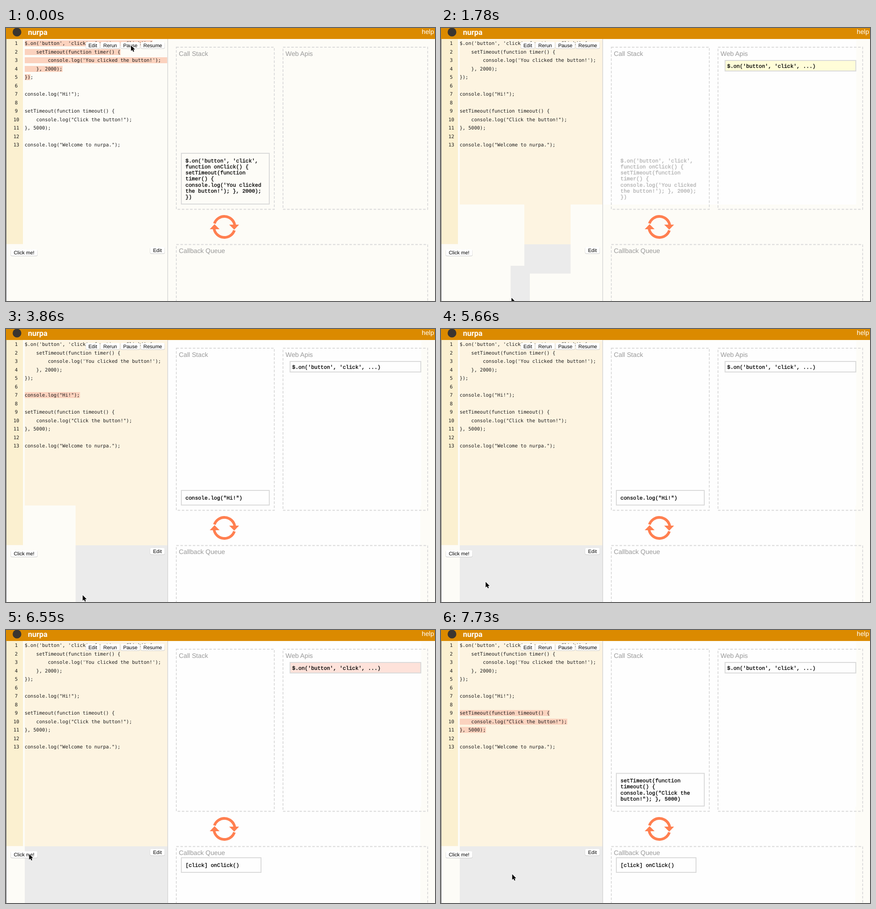
An HTML page that plays this animation: 937 px wide and 597 px high, repeating every 8 s.

```html
<!DOCTYPE html>
<html lang="en">
<head>
<meta charset="utf-8">
<title>Event loop visualiser</title>
<style>
  html, body { margin: 0; width: 100%; height: 100%; overflow: hidden; background: #fdfcf7; }
  svg { display: block; }
  text { white-space: pre; font-family: "Liberation Sans", Arial, sans-serif; text-rendering: geometricPrecision; }
  .code { font: 10.54px "DejaVu Sans Mono", monospace; fill: #1c1c1c; }
  .item { font: 11.5px "Liberation Mono", "Courier New", monospace; stroke-width: 0.35; }
  .label { font-size: 14.2px; fill: #999; }
  .button { font-size: 11px; text-anchor: middle; }
  .logo { font: bold 16.5px Roboto, sans-serif; fill: #fff; }
</style>
</head>
<body>
<svg id="stage" width="937" height="597" viewBox="0 0 937 597"></svg>
<script>
const LOOP = 8000;
const svg = document.getElementById('stage');
const timed = [];

function add(tag, attrs, parent = svg) {
  const el = document.createElementNS('http://www.w3.org/2000/svg', tag);
  for (const key in attrs) el.setAttribute(key, attrs[key]);
  return parent.appendChild(el);
}
const rect = (x, y, right, bottom, fill, more, parent) =>
  add('rect', { x, y, width: right - x, height: bottom - y, fill, ...more }, parent);
function text(str, x, y, cls, more, parent) {
  const el = add('text', { x, y, class: cls, ...more }, parent);
  el.textContent = str;
  return el;
}
// Shows an element only while from <= time < to.
function during(from, to, el = add('g', {})) {
  timed.push({ el, from, to });
  return el;
}

// Backgrounds: pale at first, repainted in stronger tones patch by patch
rect(0, 0, 937, 597, '#fdfcf7');
const clip = add('clipPath', { id: 'repainted' });
[
  [140, 270, 38, 284, 254],
  [290, 182, 236, 283, 537],
  [430, 152, 520, 194, 597],
  [1780, 41, 26, 907, 386],
  [1930, 152, 71, 905, 597],
  [5660, 41, 138, 177, 597]
].forEach(([from, ...box]) => during(from, LOOP, rect(...box, '#000', {}, clip)));
const strong = add('g', { 'clip-path': 'url(#repainted)' });
rect(37, 24, 353, 473, '#fdf4e1', {}, strong);
rect(2, 473, 353, 597, '#ebebeb', {}, strong);
rect(354, 24, 937, 597, '#fefefe', {}, strong);

rect(1, 24, 37, 472.5, '#fbf0d0');
rect(0, 24, 1, 597, '#6b6b70');
rect(352.5, 24, 354, 597, '#d6d6d6');

// Header
rect(0, 0, 937, 24, '#db8a00');
add('circle', { cx: 24, cy: 9, r: 9.5, fill: '#3a3530' });
text('nurpa', 48, 15, 'logo');
text('help', 908, 13, '', { fill: '#fff', 'font-size': 14.2 });

// Editor
const CHAR = 6.345, PITCH = 18.5;
const lines = [
  "$.on('button', 'click', function onClick() {",
  '    setTimeout(function timer() {',
  "        console.log('You clicked the button!');",
  '    }, 2000);',
  '});',
  '',
  'console.log("Hi!");',
  '',
  'setTimeout(function timeout() {',
  '    console.log("Click the button!");',
  '}, 5000);',
  '',
  'console.log("Welcome to nurpa.");'
];
function highlight(from, to, first, ends) {
  const group = during(from, to);
  ends.forEach((end, i) => {
    const y = Math.round(27 + (first - 1 + i) * PITCH);
    rect(41, y, end, y + 13, '#fbd2be', {}, group);
  });
}
const lineEnd = n => 41 + lines[n - 1].length * CHAR;
highlight(0, 1780, 1, [lineEnd(1), lineEnd(2), 352, lineEnd(4), 53.5]);
highlight(3720, 5660, 7, [lineEnd(7)]);
highlight(7730, LOOP, 9, [lineEnd(9), lineEnd(10), lineEnd(11)]);
lines.forEach((line, i) => {
  const y = 37 + i * PITCH;
  text(i + 1, 22.5, y, 'code', { 'text-anchor': 'middle' });
  text(line, 40.7, y, 'code');
});

function button(label, x, y, right) {
  rect(x, y + 0.5, right, y + 15, '#cbcbcb', { rx: 3.5 });
  rect(x + 0.5, y, right - 0.5, y + 14, '#fff', { rx: 3 });
  text(label, (x + right) / 2, y + 11, 'button');
}
button('Edit', 174, 30.5, 205);
button('Rerun', 206, 30.5, 249);
button('Pause', 250, 30.5, 293);
button('Resume', 294, 30.5, 347);
button('Click me!', 10, 484, 69);
button('Edit', 314.5, 479, 347);

// Panels
function panel(label, x, y, right, bottom) {
  rect(x, y, right, bottom, 'none',
    { stroke: '#dadada', 'stroke-width': 1.8, 'stroke-dasharray': '5.5 3.5' });
  text(label, x + 5.5, y + 18.7, 'label');
}
panel('Call Stack', 372, 42, 586, 396.5);
panel('Web Apis', 605, 42, 921, 396.5);
panel('Callback Queue', 372, 473.5, 921, 640);

// Event loop arrows
add('path', {
  d: 'M455.2 427.5A23 23 0 0 1 499.5 430.5M498.8 442.5A23 23 0 0 1 454.5 439.5',
  fill: 'none', stroke: '#ff7f50', 'stroke-width': 5.8
});
add('path', { d: 'M487.5 430H509L498.5 441ZM445 440H466.5L455.5 429Z', fill: '#ff7f50' });

// Boxed items; a faded item has grey text and no frame
function item(from, to, [x, y, right, bottom], rows, { fill = 'none', ink = '#000', frame = '#dadada', pad = 10, first = 20.5 } = {}) {
  const group = during(from, to);
  rect(x + 1, y + 1, right - 1, bottom - 1, fill, { stroke: frame, 'stroke-width': 2 }, group);
  rows.forEach((row, i) => text(row, x + pad, y + first + i * 13.3, 'item', { fill: ink, stroke: ink }, group));
}
const faded = { ink: '#b0b0b0', frame: 'none' };

const onRows = ["$.on('button', 'click',", 'function onClick() {', 'setTimeout(function',
  'timer() {', "console.log('You clicked", "the button!'); }, 2000);", '})'];
const onBox = [382, 273, 576, 386];
item(0, 1780, onBox, onRows);
item(1780, 1930, onBox, onRows, faded);

const hiRows = ['console.log("Hi!")'], hiBox = [382, 352, 576, 386];
item(3720, 3860, hiBox, hiRows, faded);
item(3860, 5810, hiBox, hiRows);

item(7730, LOOP, [382, 312.5, 576, 386],
  ['setTimeout(function', 'timeout() {', 'console.log("Click the', 'button!"); }, 5000)']);

[
  [1780, 1930, '#fffdd8', '#000'],
  [1930, 6400, '#fefefe', '#000'],
  [6400, 6550, '#fee2da', '#444'],
  [6550, 6700, '#fee2da', '#000'],
  [6700, LOOP, '#fefefe', '#000']
].forEach(([from, to, fill, ink]) =>
  item(from, to, [619.5, 70, 907, 95], ["$.on('button', 'click', ...)"],
    { fill, ink, pad: 5.5, first: 16.5 }));

const queueBox = [382, 497, 558, 531], queueRows = ['[click] onClick()'];
item(6400, 6550, queueBox, queueRows, { ink: '#999' });
item(6550, LOOP, queueBox, queueRows);

// Pointer: time, x, y
const stops = [
  [0, 273, 38], [140, 271, 237], [290, 183, 520], [430, 154, 590],
  [2080, 163, 584], [2220, 167.5, 582], [5660, 97.5, 553], [5810, 72, 517],
  [5950, 57, 499], [6100, 50.5, 490], [6700, 67, 496], [6840, 154, 533], [6990, 155.5, 534]
];
const pointer = add('path', {
  d: 'M0 0V12.2L2.8 9.7L4.8 14L6.9 13.1L5 8.9H8.7Z',
  stroke: '#fff', 'stroke-width': 1.6, 'paint-order': 'stroke'
});

function render() {
  const t = performance.now() % LOOP;
  for (const { el, from, to } of timed) el.style.display = t >= from && t < to ? '' : 'none';
  const [, x, y] = stops.findLast(stop => stop[0] <= t);
  pointer.setAttribute('transform', `translate(${x} ${y})`);
  requestAnimationFrame(render);
}
render();
</script>
</body>
</html>
```
